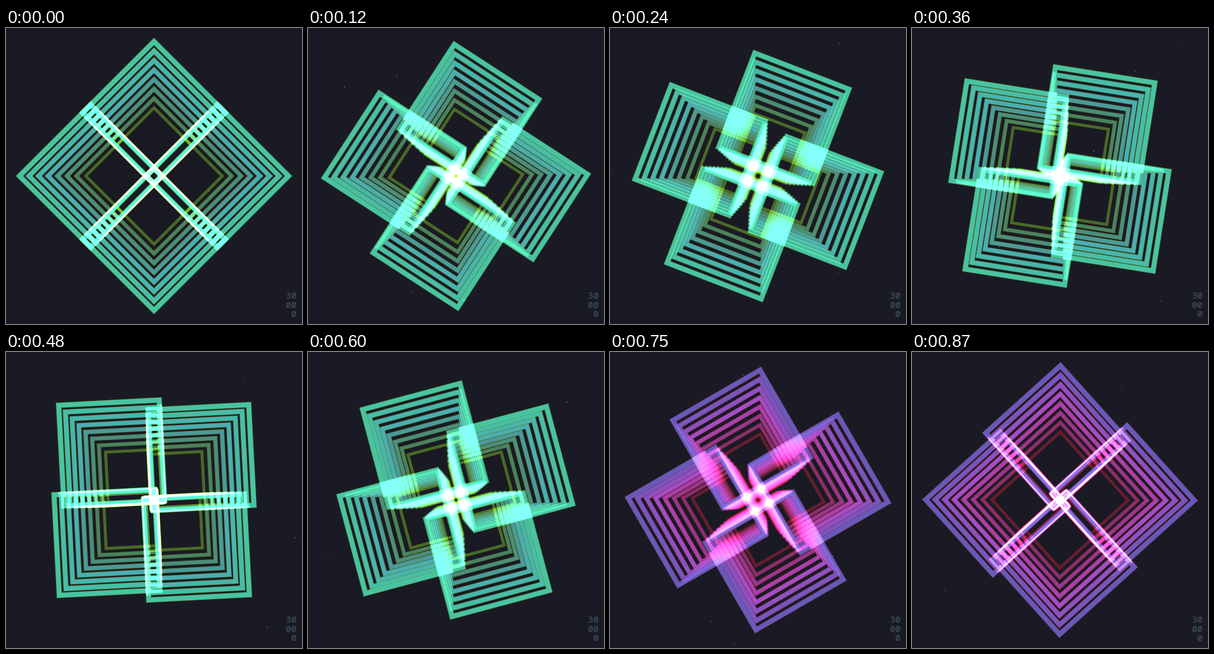
Write an HTML page with a canvas that moves like this. It is 500 px wide and 500 px high and loops after 900 ms.

```html
<!DOCTYPE html>
<html>
<head>
<meta charset="utf-8">
<style>
  html, body { margin: 0; width: 100%; height: 100%; overflow: hidden; background: #1a1a24; }
  canvas { display: block; width: 500px; height: 500px; }
</style>
</head>
<body>
<canvas width="500" height="500"></canvas>
<script>
const SIZE = 500, LOOP = 900, STEP = 30, LAYERS = 8;
const VIOLET_FROM = 690;
const ctx = document.querySelector('canvas').getContext('2d');

const armCanvas = document.createElement('canvas');
armCanvas.width = armCanvas.height = SIZE;
const arm = armCanvas.getContext('2d');

// Light added by each stroke: soft rim, inner core, outer core.
const TEAL = { rim: [46, 80, 2], inner: [4, 60, 145], outer: [-4, 90, 124] };
const VIOLET = { rim: [76, 4, 12], inner: [84, 42, 152], outer: [-6, 60, 138] };

const mix = (a, b, t) => a.map((v, i) => v + (b[i] - v) * t);
const rgb = (c, alpha = 1) => `rgba(${c.map(v => Math.max(0, Math.round(v))).join(',')},${alpha})`;

function random(seed) {
  const v = Math.sin(seed * 127.1 + 11.7) * 43758.5453;
  return v - Math.floor(v);
}

function strokeSquare(half, width, color) {
  arm.lineWidth = width;
  arm.strokeStyle = color;
  arm.strokeRect(-half, -half, half * 2, half * 2);
}

// Fades what lies under the inner side of a stroke, so nested edges
// replace each other while edges that stick out still add up.
function fadeInside(half, width) {
  const edge = half + 1;
  arm.save();
  arm.beginPath();
  arm.rect(-edge, -edge, edge * 2, edge * 2);
  arm.clip();
  arm.globalCompositeOperation = 'destination-out';
  strokeSquare(half, width, 'rgba(0,0,0,0.75)');
  arm.restore();
}

// Squares orbit clockwise while turning the other way at the same rate.
function drawArm(orbit, palette) {
  arm.clearRect(0, 0, SIZE, SIZE);
  for (let k = 0; k < LAYERS; k++) {
    const half = 45.4 + 8 * Math.SQRT1_2 * k;
    const width = 5 + 4.5 * Math.sqrt(k / (LAYERS - 1));
    arm.save();
    arm.translate(SIZE / 2, SIZE / 2);
    arm.rotate(orbit);
    arm.translate(0, -(51 + 8 * k));
    arm.rotate(Math.PI / 4 - 2 * orbit);
    fadeInside(half, width);
    arm.globalCompositeOperation = 'lighter';
    strokeSquare(half, width, rgb(palette.rim));
    if (k) {
      const tone = mix(palette.inner, palette.outer, Math.max(0, (k - 3) / 4));
      strokeSquare(half, width - 1.5, rgb(tone, Math.min(1, 0.2 + k / 5)));
    }
    arm.restore();
  }
}

function drawDust(step) {
  const count = Math.floor(random(step + 3) * 6) + 1;
  for (let i = 0; i < count; i++) {
    const seed = step * 31 + i * 7;
    ctx.fillStyle = `hsl(${random(seed) * 360}, 35%, 30%)`;
    ctx.fillRect(random(seed + 1) * 498, random(seed + 2) * 498, 2, 2);
  }
}

function drawDigits() {
  ctx.font = '15px "Noto Sans Mono", monospace';
  ctx.textAlign = 'right';
  ['30', '00', '0'].forEach((row, i) => {
    const y = 457 + i * 15.5;
    ctx.fillStyle = 'rgb(34,38,6)';
    ctx.fillText(row, 490.5, y);
    ctx.fillStyle = 'rgb(6,24,56)';
    ctx.fillText(row, 491.5, y);
  });
}

function render(now) {
  const step = Math.floor((now % LOOP) / STEP);
  const time = step * STEP;
  const orbit = time / LOOP * Math.PI / 2;

  ctx.globalCompositeOperation = 'source-over';
  ctx.fillStyle = '#1a1a24';
  ctx.fillRect(0, 0, SIZE, SIZE);
  drawDust(step);

  drawArm(orbit, time < VIOLET_FROM ? TEAL : VIOLET);
  ctx.globalCompositeOperation = 'lighter';
  for (let turn = 0; turn < 4; turn++) {
    ctx.save();
    ctx.translate(SIZE / 2, SIZE / 2);
    ctx.rotate(turn * Math.PI / 2);
    ctx.drawImage(armCanvas, -SIZE / 2, -SIZE / 2);
    ctx.restore();
  }
  drawDigits();
}

const start = performance.now();
function tick() {
  render(performance.now() - start);
  requestAnimationFrame(tick);
}
tick();
</script>
</body>
</html>
```
